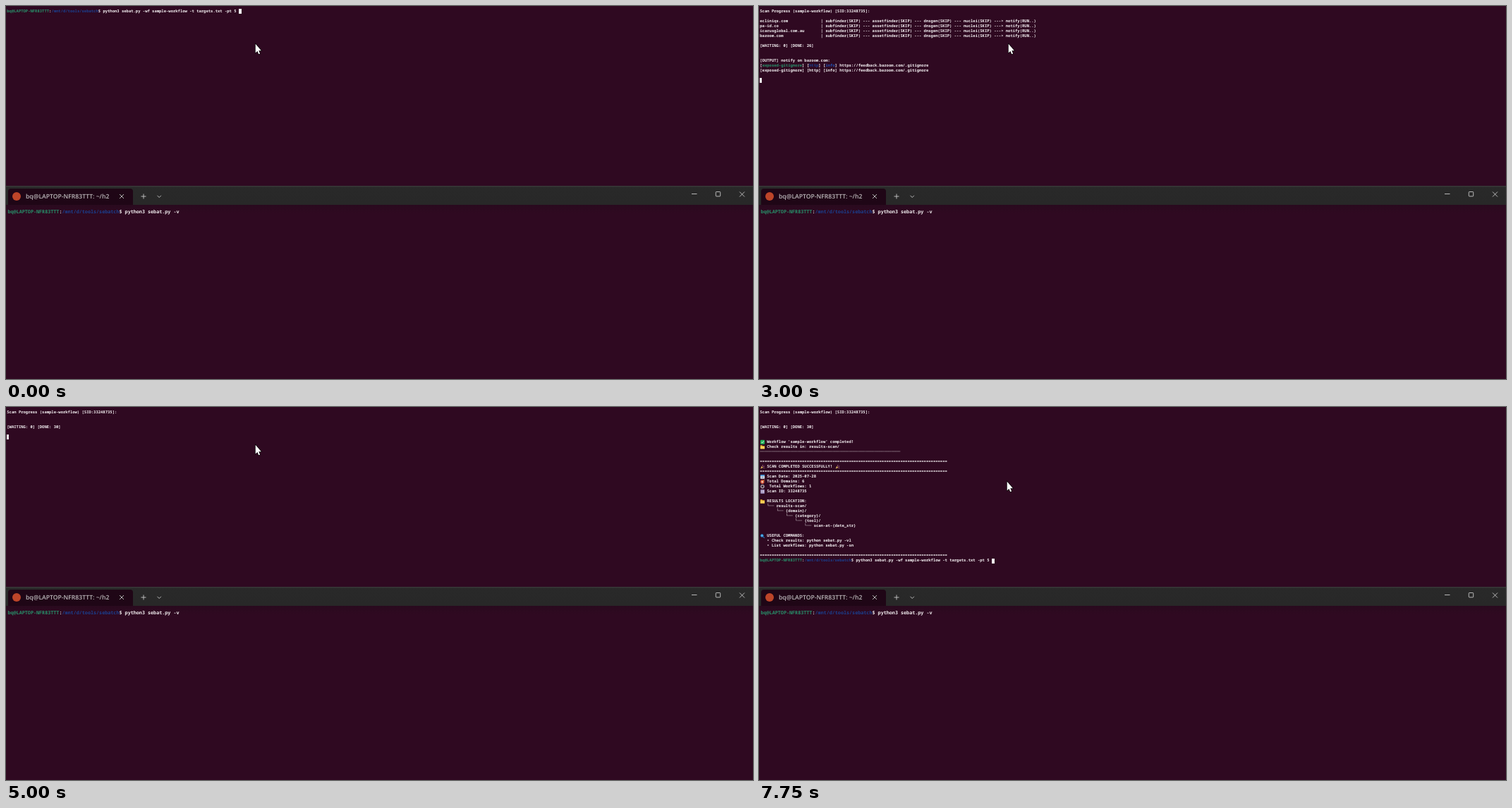
An HTML page for the animation above (8 s loop, 1059 by 529 pixels).

```html
<!DOCTYPE html>
<html lang="en">
<head>
<meta charset="utf-8">
<title>Terminal scan</title>
<style>
  html, body { margin: 0; width: 100%; height: 100%; overflow: hidden; background: #2f0921; }
  #stage { position: relative; width: 1059px; height: 529px; overflow: hidden; background: #2f0921; }
  #stage > * { position: absolute; }
  pre {
    margin: 0; color: #f3eff1; font-weight: 600; text-rendering: geometricPrecision; font-variant-ligatures: none;
    font-family: "Noto Sans Mono", "DejaVu Sans Mono", monospace;
  }
  #screen { left: 1.3px; top: 4px; font-size: 5.542px; line-height: 7.02px; }
  #shell { left: 2.5px; top: 288px; font-size: 6.767px; line-height: 8px; }
  .g { color: #28906a; }
  .b { color: #1b4090; }
  .i { color: #2150b4; }
  .m { color: #b9592d; }
  .line { font-weight: 800; }
  #cursor { width: 3.2px; height: 7px; background: #f0edef; }
  #scrollbar { left: 1055px; top: 66px; width: 2px; height: 175px; border-radius: 1px; background: #b5adb2; }
  #bar { left: 0; top: 255px; width: 1059px; height: 27px; background: linear-gradient(#383838 1px, #292929 2px, #282828); }
  #shade { left: 0; top: 282px; width: 1059px; height: 12px; background: linear-gradient(#290a1e, #2f0921); }
  #tab { left: 3px; top: 259px; width: 177px; height: 23px; border-radius: 4px 4px 0 0; background: #1f0616; }
  #title {
    left: 28px; top: 264px; white-space: pre; color: #bcb8ba;
    font: 600 8.6px/13px "Open Sans", "Noto Sans", sans-serif; text-rendering: geometricPrecision;
  }
  svg { left: 0; top: 0; }
</style>
</head>
<body>
<div id="stage">
  <pre id="screen"></pre>
  <div id="cursor"></div>
  <div id="scrollbar"></div>
  <div id="bar"></div>
  <div id="shade"></div>
  <div id="tab"></div>
  <div id="title"></div>
  <pre id="shell"></pre>
  <svg width="1059" height="529">
    <circle cx="15" cy="270" r="6" fill="#bd4529"/>
    <g fill="none" stroke="#c8c8c8" stroke-width=".9">
      <path d="M161 267l6 6m0-6l-6 6M191.5 270h7m-3.5-3.5v7M214.5 268.8l2.7 2.7 2.7-2.7"/>
      <path d="M972 266.5h7.5M1040 263.5l7 7m0-7l-7 7"/>
      <rect x="1006.3" y="263.5" width="6.4" height="6.4" rx=".8"/>
    </g>
    <g id="icons"></g>
    <path id="pointer" d="M.7 .8V13.4L3.4 10.9L5.2 15.2L7.1 14.4L5.3 10.2H8.9Z" fill="#fff" stroke="#000" stroke-width="1.2" paint-order="stroke"/>
  </svg>
</div>
<script>
const LOOP = 8000, CELL = 3.325, ROW = 7.02;
const $ = id => document.getElementById(id);
const span = (cls, text) => `<span class="${cls}">${text}</span>`;

const host = "bq@LAPTOP-NFR83TTT";
const prompt = span("g", host) + ":" + span("b", "/mnt/d/tools/sebatch") + "$ ";
const command = "python3 sebat.py -wf sample-workflow -t targets.txt -pt 5 ";
const header = "Scan Progress (sample-workflow) [SID:33248735]:";

const status = (waiting, done) => `[WAITING: ${waiting}] [DONE: ${done}]`;
const progress = domain => domain.padEnd(26) +
  "| subfinder(SKIP) --- assetfinder(SKIP) --- dnsgen(SKIP) --- nuclei(SKIP) ---> notify(RUN..)";
const running = (domains, done, waiting) =>
  [header, "", ...domains.map(progress), "", status(waiting, done)];

const finding = (kind, url, colored) => {
  const level = kind === "git-config" ? "medium" : "info";
  const paint = (cls, text) => colored ? span(cls, text) : text;
  return `[${paint("g", kind)}] [${paint("b", "http")}] ` +
    `[${paint(level === "info" ? "i" : "m", level)}] https://${url}`;
};
const heading = domain => `[OUTPUT] notify on ${domain}:`;

const ignoreFile = "exposed-gitignore", config = "git-config", logs = "git-logs-exposure";
const bazoom = [heading("bazoom.com"),
  ...[true, false].map(c => finding(ignoreFile, "feedback.bazoom.com/.gitignore", c))];

const clinic = [
  [ignoreFile, "app", ".gitignore"], [config, "app", ".git/config"], [logs, "app", ".git/logs/HEAD"],
  [ignoreFile, "www.app", ".gitignore"], [logs, "www.app", ".git/logs/HEAD"], [config, "www.app", ".git/config"],
  [ignoreFile, "invoice", ".gitignore"], [ignoreFile, "invoice", "assets/.gitignore"],
  [ignoreFile, "www.invoice", ".gitignore"], [ignoreFile, "www.invoice", "assets/.gitignore"]
];
const clinicLine = ([kind, sub, path], colored) => finding(kind, `${sub}.ecliniqs.com/${path}`, colored);
const report = [
  ...bazoom, "", "",
  heading("ecliniqs.com"),
  ...clinic.map(f => clinicLine(f, true)),
  ...[6, 2, 1, 0, 3, 4, 5, 8, 7, 9].map(n => clinicLine(clinic[n], false)), "", "",
  heading("pa-id.co"),
  ...["lab.", "", "api."].map(sub => finding(config, sub + "pa-id.co/.git/config", false))
];

const tree = ["results-scan/", "{domain}/", "{category}/", "{tool}/", "scan-at-{date_str}"]
  .map((name, depth) => " ".repeat(3 + 4 * depth) + span("line", "└── ") + name);
const rule = "=".repeat(80);
const finished = [header, "", "", status(0, 30)];
const summary = [
  ...finished, "", "",
  "   Workflow 'sample-workflow' completed!",
  "   Check results in: results-scan/",
  span("line", "─".repeat(60)), "",
  rule, "   SCAN COMPLETED SUCCESSFULLY!", rule,
  "   Scan Date: 2025-07-28",
  "   Total Domains: 6",
  "    Total Workflows: 1",
  "   Scan ID: 33248735", "",
  "   RESULTS LOCATION:", ...tree, "",
  "   USEFUL COMMANDS:",
  "   • Check results: python sebat.py -vl",
  "   • List workflows: python sebat.py -sn", "",
  rule
];

const early = ["ecliniqs.com", "pa-id.co", "bazoom.com", "rotacloud.com", "scanme.sh"];
const late = ["ecliniqs.com", "pa-id.co", "icarusglobal.com.au", "bazoom.com"];
const last = running(["icarusglobal.com.au"], 29, 0);

// start time, text, cursor cell and extras
const screens = [
  { at: 0, lines: [prompt + command], col: 99, row: 0 },
  { at: 630, lines: [prompt + command], col: 0, row: 1 },
  { at: 880, lines: [], col: 0, row: 2 },
  { at: 1880, lines: running(early, 20, 5), col: 0, row: 10 },
  { at: 2880, lines: running(late, 26, 0), col: 0, row: 9 },
  { at: 3000, lines: [...running(late, 26, 0), "", "", ...bazoom], col: 0, row: 14 },
  { at: 3130, lines: report, col: 0, row: 33, scroll: true },
  { at: 3880, lines: last, col: 0, row: 6, scroll: true },
  { at: 4000, lines: last, col: 0, row: 6 },
  { at: 5000, lines: finished, col: 0, row: 5 },
  { at: 5130, lines: [...summary, prompt], col: 41, row: 30, icons: true },
  { at: 7750, lines: [...summary, prompt + command], col: 99, row: 30, icons: true }
];

const pointerStops = [
  [0, 353, 53], [6000, 297, 40], [6130, 240, 92], [6250, 188, 158], [6380, 156, 198],
  [6500, 148, 207], [6630, 149, 205], [6750, 150, 203], [6880, 351, 105]
];

const folder = '<path d="M.5 1h2.4l.8 1H6.6V6.2H.5Z" fill="#f0b52e"/><path d="M.5 3H6.6V6.2H.5Z" fill="#ffd15a"/>';
const party = '<path d="M.8 6.3L2.4 2.6L4.6 4.8Z" fill="#d9b15b"/><path d="M3.4 2.6L4.2.8M4.6 3.6L6.4 2.6M5 5l1.3.4" stroke="#c97fa6" stroke-width=".8"/>';
const icons = [
  [6, 0, '<rect x=".6" y=".6" width="6" height="6" rx=".8" fill="#22b45a"/><path d="M2 3.6l1.2 1.3 2-2.6" fill="none" stroke="#fff" stroke-width=".8"/>'],
  [7, 0, folder],
  [11, 0, party],
  [11, 32, party],
  [13, 0, '<rect x=".6" y=".8" width="6" height="5.8" rx=".6" fill="#d5dde6"/><path d="M.6.8h6v1.8h-6Z" fill="#3c8fd0"/><path d="M2 4.2h3.2" stroke="#6b8fb0"/>'],
  [14, 0, '<circle cx="3.4" cy="3.8" r="2.8" fill="#d8573a"/><circle cx="3.4" cy="3.8" r="1.3" fill="#f3d9cf"/><path d="M3.4 3.8L6.5.8" stroke="#e9a63c" stroke-width=".9"/>'],
  [15, 0, '<circle cx="3.5" cy="3.5" r="2" fill="none" stroke="#a79fa8" stroke-width="1.3"/><circle cx="3.5" cy="3.5" r="2.8" fill="none" stroke="#a79fa8" stroke-width=".7" stroke-dasharray="1.1"/>'],
  [16, 0, '<rect x=".6" y=".6" width="6" height="6" rx=".8" fill="#8d7ca9"/><path d="M2.3 2v3.2M3.8 2.3h1.2v2.6H3.8Z" fill="none" stroke="#eee5f5" stroke-width=".7"/>'],
  [18, 0, folder],
  [25, 0, '<circle cx="2.9" cy="2.9" r="1.9" fill="#57b2ec" stroke="#2176bd" stroke-width=".8"/><path d="M4.4 4.4L6.4 6.4" stroke="#2176bd" stroke-width="1.1"/>']
];

$("title").textContent = host + ": ~/h2";
$("shell").innerHTML = prompt + "python3 sebat.py -v";
$("icons").innerHTML = icons.map(([row, col, art]) =>
  `<g transform="translate(${1.4 + col * CELL} ${4 + row * ROW})">${art}</g>`).join("");

let shown;
function show(screen) {
  if (screen === shown) return;
  shown = screen;
  $("screen").innerHTML = screen.lines.join("\n");
  $("cursor").style.left = 1.2 + screen.col * CELL + "px";
  $("cursor").style.top = 4 + screen.row * ROW + "px";
  $("scrollbar").style.display = screen.scroll ? "block" : "none";
  $("icons").style.display = screen.icons ? "inline" : "none";
}

function draw() {
  const t = performance.now() % LOOP;
  show(screens.findLast(s => s.at <= t));
  const [, x, y] = pointerStops.findLast(([at]) => at <= t);
  $("pointer").setAttribute("transform", `translate(${x} ${y})`);
  requestAnimationFrame(draw);
}
draw();
</script>
</body>
</html>
```
